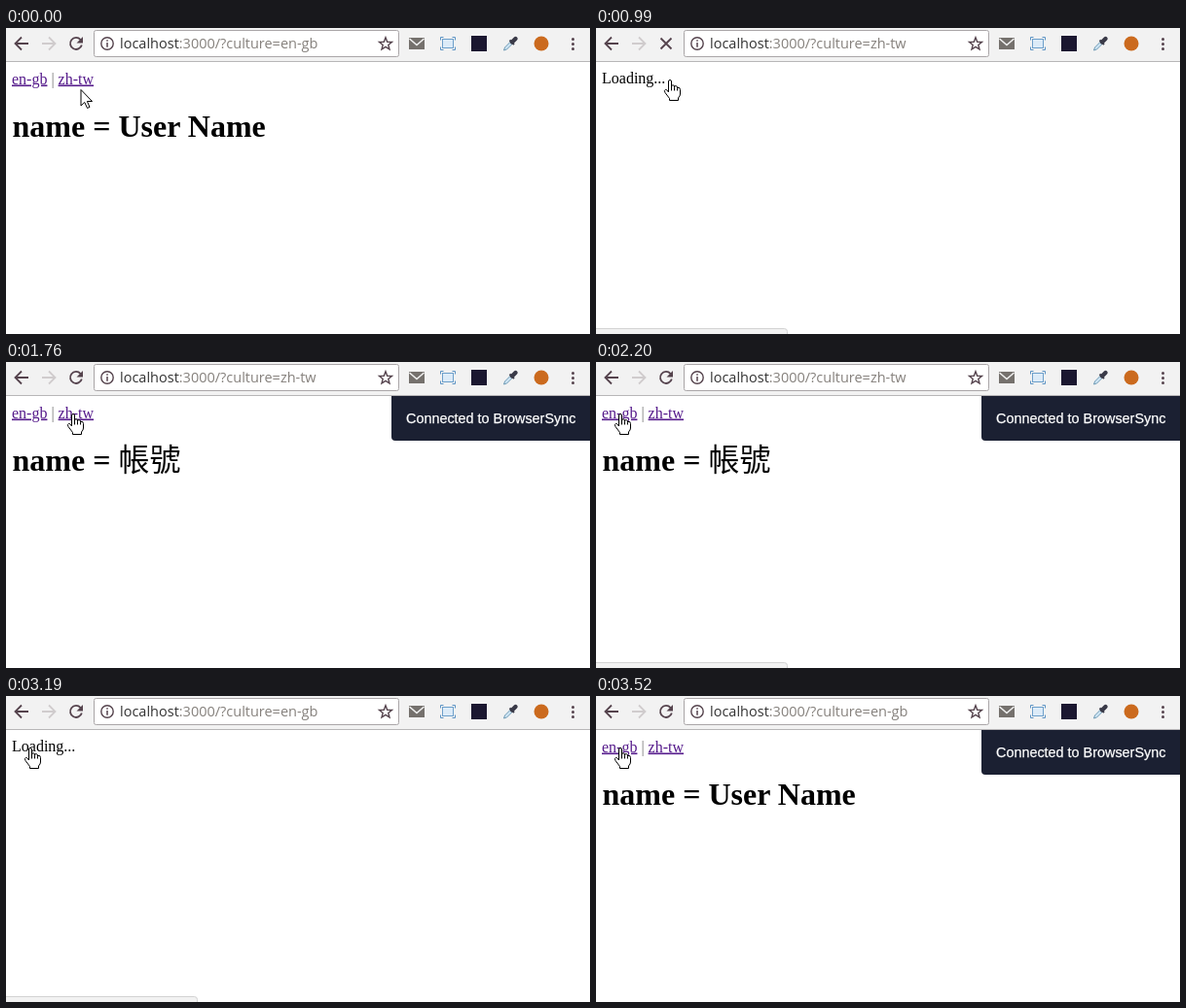
An HTML page that plays this animation: 600 by 315 pixels, repeating every 3.63 s.

```html
<!DOCTYPE html>
<html lang="en">
<head>
<meta charset="utf-8">
<title>Culture switch</title>
<style>
html, body { margin: 0; width: 100%; height: 100%; overflow: hidden; background: #fff; }
svg { display: block; }
text { white-space: pre; }
.serif { font: 16px "Liberation Serif", serif; }
.h1 { font: bold 32px "Liberation Serif", serif; }
.cjk { font: 350 32px "Noto Sans CJK TC", "Noto Sans CJK", sans-serif; }
.url { font: 14.5px "Open Sans", sans-serif; fill: #85807c; }
.toast { font: 14.4px "Liberation Sans", sans-serif; fill: #fff; stroke: #fff; stroke-width: .25; }
.link { fill: #551a8b; text-decoration: underline; text-decoration-skip-ink: none; }
.line { fill: none; stroke: #55434d; stroke-width: 1.8; }
</style>
</head>
<body>
<svg width="600" height="315" viewBox="0 0 600 315">
  <rect width="600" height="34" fill="#f2f2f2"/>
  <rect y="34" width="600" height="1" fill="#b8b6b8"/>

  <!-- navigation -->
  <path class="line" d="M23 16H10M16 9.5L9.5 16L16 22.5"/>
  <path class="line" style="stroke:#d0cccd" d="M37 16H50M44 9.5L50.5 16L44 22.5"/>
  <g id="reload">
    <path class="line" d="M76.6 12.1A6 6 0 1 0 77.8 17.5"/>
    <path fill="#55434d" d="M79 9V15.5H72.5Z"/>
  </g>
  <path id="stop" class="line" d="M66.5 10.5L77.5 21.5M77.5 10.5L66.5 21.5"/>

  <!-- address bar -->
  <rect x="90.5" y="2.5" width="313" height="27" rx="2" fill="#fff" stroke="#aaa6a8"/>
  <circle class="line" style="stroke-width:1.4" cx="104" cy="16" r="6.2"/>
  <path class="line" style="stroke-width:1.5" d="M104 12.2V13.8M104 15V19.8"/>
  <text class="url" x="117" y="21"><tspan fill="#333">localhost</tspan>:3000/?culture=<tspan id="culture"></tspan></text>
  <path id="star" class="line" style="stroke-width:1.4"/>

  <!-- extensions -->
  <rect x="414" y="10" width="16" height="12" fill="#75716d"/>
  <path d="M414.5 11L422 17.5L429.5 11" fill="none" stroke="#f2f2f2" stroke-width="1.5"/>
  <rect x="448.5" y="11.5" width="11" height="9" fill="#dcebf8" stroke="#6d9fca"/>
  <path d="M446.5 12.5V9.5H449.5M458.5 9.5H461.5V12.5M461.5 19.5V22.5H458.5M449.5 22.5H446.5V19.5" fill="none" stroke="#5c93c4"/>
  <rect x="478" y="8" width="16" height="16" fill="#1b1730"/>
  <path d="M511.5 23L512.5 20L518 14.5L520 16.5L514.5 22Z" fill="#cfe6f5" stroke="#6f9ab5"/>
  <path d="M517.5 12.5L522 17" stroke="#3a3a48" stroke-width="2"/>
  <path d="M520 14.5L523.5 11" stroke="#3a3a48" stroke-width="4.4" stroke-linecap="round"/>
  <circle cx="550" cy="16" r="7.5" fill="#cb6a1e"/>
  <g fill="#55434d">
    <circle cx="582.5" cy="11.5" r="1.5"/><circle cx="582.5" cy="16.5" r="1.5"/><circle cx="582.5" cy="21.5" r="1.5"/>
  </g>

  <!-- page -->
  <text id="loading" class="serif" x="6" y="57">Loading...</text>
  <g id="page">
    <text id="en" class="serif link" x="6" y="57.5">en-gb</text>
    <text class="serif" x="46.4" y="57.5" fill="#777">|</text>
    <text id="zh" class="serif link" x="53.6" y="57.5">zh-tw</text>
    <text class="h1" x="6.5" y="111.5">name = <tspan id="label"></tspan></text>
  </g>
  <g id="toast">
    <path d="M396 35H600V81H400Q396 81 396 77Z" fill="#1b2032"/>
    <text class="toast" x="411" y="63">Connected to BrowserSync</text>
  </g>
  <path id="status" d="M-1 309.5H193.5Q196.5 309.5 196.5 312.5V317H-1Z" fill="#f2f2f2" stroke="#d2d2d2"/>

  <!-- pointers -->
  <path id="arrow" d="M0 0V16.5L3.8 13L6.5 19L9 17.9L6.4 12H11.5Z" transform="translate(77 63.5)" fill="#fff" stroke="#000"/>
  <path id="hand" fill="#fff" stroke="#000" stroke-linejoin="round"
    d="M-1.5 13V2Q-1.5 .5 0 .5Q1.5 .5 1.5 2V8V6.5Q3 5 4.5 6.5V8.5V7.2Q6 5.8 7.5 7.5V9.5V8.5Q10.5 7.5 10.5 10.5V15Q10.5 17 8.5 19V21.5H-.5V19.5L-5 13.5Q-6.5 11 -4.5 10.3Q-3.5 10 -1.5 13ZM1.5 8V11.5M4.5 8.5V11.5M7.5 9.5V11.5"/>
</svg>
<script>
const $ = id => document.getElementById(id);
const LOOP = 3630;

// Each step changes part of the state; [x, y] is the fingertip.
const steps = [
  [0, { culture: "en-gb", text: "en-gb", page: true, stop: false, toast: false, status: 0, press: "", hand: null }],
  [100, { hand: [76, 53] }],
  [220, { status: .5 }],
  [340, { status: 1 }],
  [770, { press: "zh" }],
  [990, { culture: "zh-tw", page: false, stop: true, press: "" }],
  [1110, { stop: false, toast: true }],
  [1330, { page: true, text: "zh-tw", status: .3 }],
  [1430, { status: 0 }],
  [1760, { hand: [69, 53] }],
  [1860, { hand: [56, 53] }],
  [1980, { hand: [39, 53] }],
  [2090, { hand: [25, 53], status: .5 }],
  [2200, { status: 1 }],
  [2970, { press: "en" }],
  [3070, { culture: "en-gb", page: false, stop: true, toast: false, press: "" }],
  [3190, { stop: false }],
  [3290, { toast: true }],
  [3520, { page: true, text: "en-gb", status: 0 }]
];

const star = Array.from({ length: 10 }, (_, i) => {
  const r = i % 2 ? 2.9 : 6.8, a = i * Math.PI / 5;
  return [390 + r * Math.sin(a), 16.5 - r * Math.cos(a)].map(v => v.toFixed(1));
});
$("star").setAttribute("d", "M" + star.join("L") + "Z");

const show = (id, on) => $(id).style.display = on ? "" : "none";

function draw(t) {
  const s = Object.assign({}, ...steps.filter(([at]) => at <= t).map(([, change]) => change));
  $("culture").textContent = s.culture;
  const chinese = s.text === "zh-tw";
  $("label").textContent = chinese ? "帳號" : "User Name";
  $("label").setAttribute("class", chinese ? "cjk" : "");
  show("page", s.page);
  show("loading", !s.page);
  show("stop", s.stop);
  show("reload", !s.stop);
  show("toast", s.toast);
  show("arrow", !s.hand);
  show("hand", s.hand);
  $("status").style.opacity = s.status;
  for (const id of ["en", "zh"]) $(id).style.fill = s.press === id ? "#f00" : "";
  if (s.hand) $("hand").setAttribute("transform", `translate(${s.hand})`);
}

const start = performance.now();
function tick() {
  draw((performance.now() - start) % LOOP);
  requestAnimationFrame(tick);
}
tick();
</script>
</body>
</html>
```
